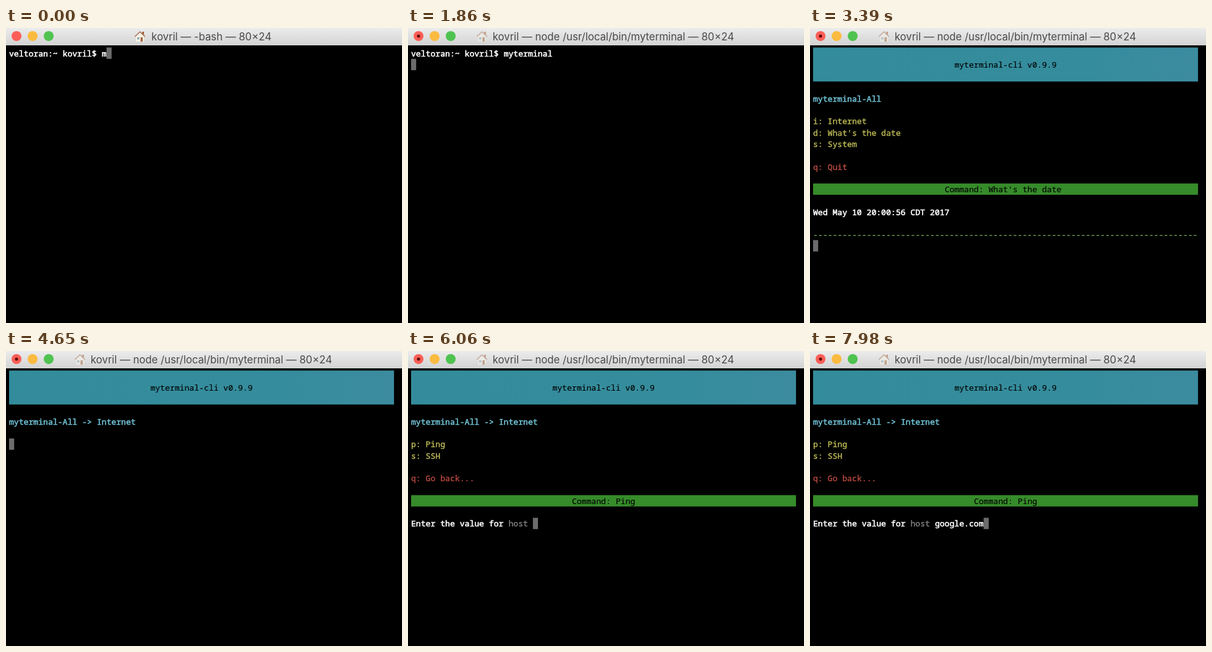
An HTML page that plays this animation: 640 by 476 pixels, repeating every 8 s.

```html
<!DOCTYPE html>
<html lang="en">
<head>
<meta charset="utf-8">
<title>Terminal session</title>
<style>
  html, body { margin: 0; width: 100%; height: 100%; overflow: hidden; background: #000; }
  svg { display: block; width: 100%; height: 100%; }
  .title { font: 16.75px Inter, sans-serif; fill: #4a4a4a; text-anchor: end; }
  #screen text {
    font: 13.125px "Noto Sans Mono", monospace; white-space: pre;
    fill: var(--ink); stroke: var(--ink); stroke-width: .35px;
  }
  #screen .plain { --ink: #fff; stroke-width: .6px; }
  #screen .path { --ink: #72c6da; stroke-width: .5px; }
  #screen .item { --ink: #c2be58; }
  #screen .quit { --ink: #bd4b41; }
  #screen .rule { --ink: #78ac5c; }
  #screen .dim { --ink: #858585; }
  #screen .dark { --ink: #000; stroke-width: .15px; }
</style>
</head>
<body>
<svg viewBox="0 0 640 476">
  <defs>
    <linearGradient id="bar" x2="0" y2="1">
      <stop stop-color="#ececec"/><stop offset="1" stop-color="#d3d3d3"/>
    </linearGradient>
    <linearGradient id="banner">
      <stop stop-color="#338c9b"/><stop offset=".7" stop-color="#358c9c"/><stop offset="1" stop-color="#3c8b9f"/>
    </linearGradient>
    <g id="house">
      <path d="M12.5 1.5h3v5h-3z" fill="#a3603c"/>
      <path d="M2.5 8 9 2l6.500 6v9.500h-13z" fill="#f6f1e6"/>
      <path d="M.8 9.300 9 1.700l8.200 7.600" fill="none" stroke="#a87a60" stroke-width="1.600"/>
      <path d="M4.500 10.500h3.500v3.500h-3.500z" fill="#8cabb5"/>
      <path d="M10 10.500h3.500v7h-3.500z" fill="#a46a40"/>
    </g>
  </defs>
  <rect width="640" height="476"/>
  <rect width="640" height="28" fill="url(#bar)"/>
  <circle cx="17" cy="13" r="8" fill="#fb5f57"/>
  <circle cx="43" cy="13" r="8" fill="#fbbb40"/>
  <circle cx="69" cy="13" r="8" fill="#4fc350"/>
  <g id="idle">
    <use href="#house" x="207.500" y="4.500"/>
    <text class="title" x="429" y="19.500">kovril — -bash — 80×24</text>
  </g>
  <g id="busy">
    <circle cx="17" cy="13" r="2.600" fill="#650b08"/>
    <use href="#house" x="110.500" y="4.500" opacity=".5"/>
    <text class="title" x="527" y="19.500">kovril — node /usr/local/bin/myterminal — 80×24</text>
  </g>
  <g id="screen"></g>
</svg>
<script>
const LOOP = 8000, LEFT = 5, TOP = 31.5, COL = 7.875, ROW = 18.28, COLS = 79;
const LAUNCH = 1740, MENU = 2400, DATE = 3270, INTERNET = 4620, ITEMS = 4680, PING = 5760;
const PROMPT = 'veltoran:~ kovril$ ', QUESTION = 'Enter the value for host ';

const screen = document.getElementById('screen');
const parts = [];

function make(tag, attrs, content = '') {
  const el = document.createElementNS('http://www.w3.org/2000/svg', tag);
  for (const key in attrs) el.setAttribute(key, attrs[key]);
  el.textContent = content;
  return el;
}

function during(el, from, to = LOOP) {
  parts.push({ el, from, to });
  return el;
}

function line(row, col, text, kind, from, to) {
  const attrs = { x: LEFT + col * COL, y: TOP + row * ROW + 14.2, class: kind };
  return screen.appendChild(during(make('text', attrs, text), from, to));
}

function band(row, rows, fill, from, to) {
  const attrs = { x: LEFT, y: TOP + row * ROW, width: COLS * COL, height: rows * ROW, fill };
  screen.append(during(make('rect', attrs), from, to));
}

function commandBar(row, col, name, from, to) {
  band(row, 1, '#368b2a', from, to);
  line(row, col, 'Command: ' + name, 'dark', from, to);
}

// Shell prompt
line(0, 0, PROMPT, 'plain', 0, MENU);
const command = line(0, PROMPT.length, '', 'plain', 0, MENU);

// Main menu
band(0, 3, 'url(#banner)', MENU);
line(1, 29, 'myterminal-cli v0.9.9', 'dark', MENU);
line(4, 0, 'myterminal-All', 'path', MENU);
['i: Internet', "d: What's the date", 's: System'].forEach((text, i) =>
  line(6 + i, 0, text, 'item', MENU, INTERNET));
line(10, 0, 'q: Quit', 'quit', MENU, INTERNET);

// Date command
commandBar(12, 27, "What's the date", DATE, INTERNET);
line(14, 0, 'Wed May 10 20:00:56 CDT 2017', 'plain', DATE, INTERNET);
line(16, 0, '-'.repeat(COLS), 'rule', DATE, INTERNET);

// Submenu and ping command
line(4, 14, ' -> Internet', 'path', INTERNET);
line(6, 0, 'p: Ping', 'item', ITEMS);
line(7, 0, 's: SSH', 'item', ITEMS);
line(9, 0, 'q: Go back...', 'quit', ITEMS);
commandBar(11, 33, 'Ping', PING);
line(13, 0, 'Enter the value for', 'plain', PING);
line(13, 20, 'host', 'dim', PING);
const host = line(13, QUESTION.length, '', 'plain', PING);

const cursor = screen.appendChild(make('rect', { width: COL + 0.3, height: ROW, fill: '#6c6c6c' }));

during(document.getElementById('idle'), 0, LAUNCH);
during(document.getElementById('busy'), LAUNCH);

const typed = (text, t, start, step) =>
  text.slice(0, Math.max(0, Math.floor((t - start) / step) + 1));

function cursorCell(t) {
  if (t < LAUNCH) return [PROMPT.length + command.textContent.length, 0];
  if (t < MENU) return [0, 1];
  if (t < DATE) return [0, 12];
  if (t < INTERNET) return [0, 17];
  if (t < ITEMS) return [0, 6];
  if (t < PING) return [0, 11];
  return [QUESTION.length + host.textContent.length, 13];
}

function draw(now) {
  const t = now % LOOP;
  command.textContent = typed('myterminal', t, 0, 155);
  host.textContent = typed('google.com', t, 6540, 135);
  for (const { el, from, to } of parts) el.style.display = t >= from && t < to ? '' : 'none';
  const [col, row] = cursorCell(t);
  cursor.setAttribute('x', LEFT + col * COL);
  cursor.setAttribute('y', TOP + row * ROW);
}

const started = performance.now();
function tick() {
  draw(performance.now() - started);
  requestAnimationFrame(tick);
}
tick();
</script>
</body>
</html>
```
